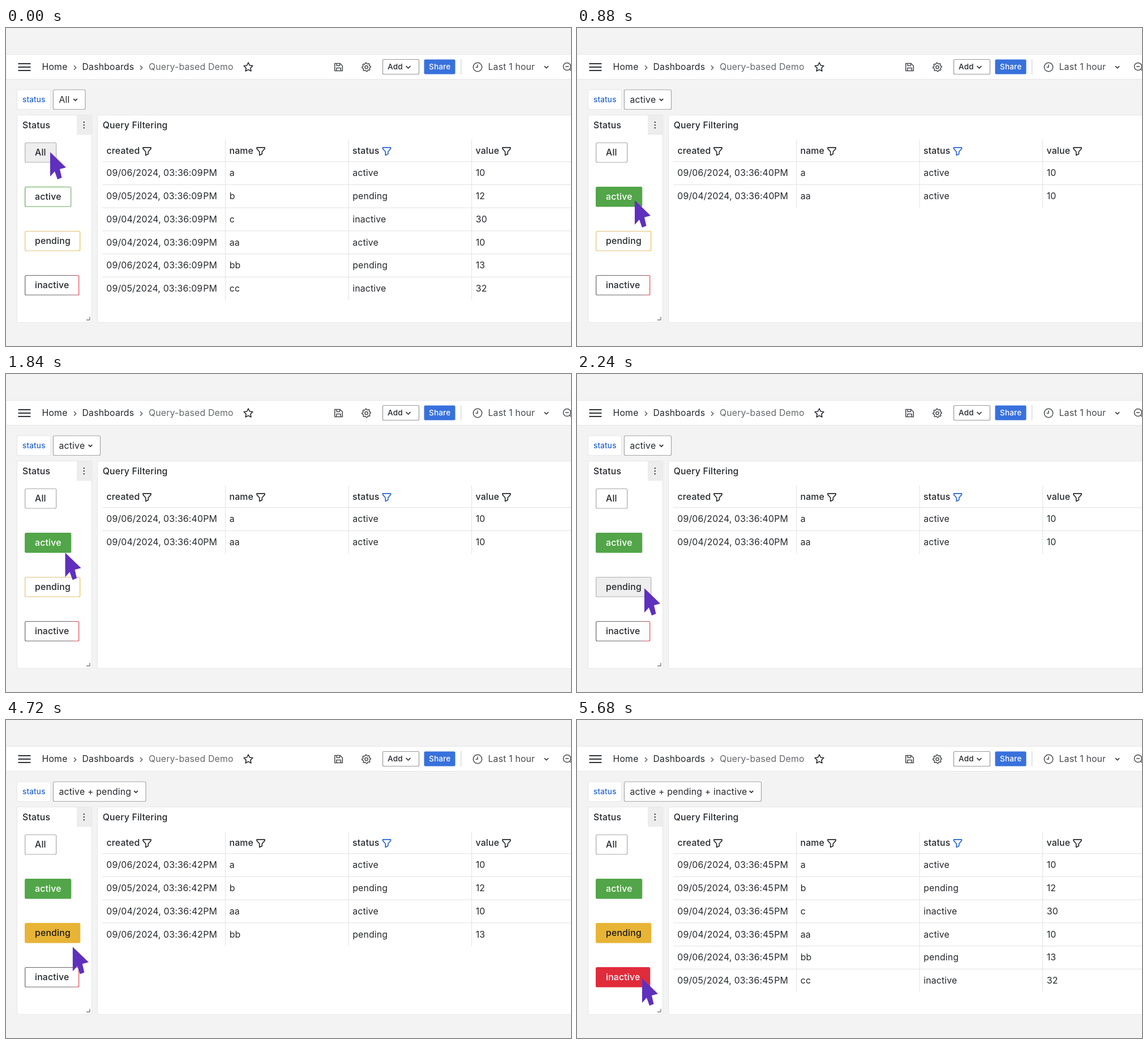
An HTML page with a canvas that plays this animation: 998x561 px, repeating every 6 s.

```html
<!DOCTYPE html>
<html lang="en">
<head>
<meta charset="utf-8">
<title>Query filtering dashboard</title>
<style>
  html, body { margin: 0; width: 100%; height: 100%; overflow: hidden; background: #f3f3f3; }
  canvas { display: block; width: 998px; height: 561px; }
</style>
</head>
<body>
<canvas id="stage"></canvas>
<script>
const W = 998, H = 561, LOOP = 6000;
const canvas = document.getElementById('stage');
const ctx = canvas.getContext('2d');
const dpr = window.devicePixelRatio || 1;
canvas.width = W * dpr;
canvas.height = H * dpr;

const INK = '#25282d', LINE = '#e3e4e6', BLUE = '#2463d6';
const BODY = 15.83, SMALL = 13.56;
const ROW_TOP = 235.6, ROW_H = 40.75;

const records = [
  ['09/06/2024', 'a', 'active', '10'],
  ['09/05/2024', 'b', 'pending', '12'],
  ['09/04/2024', 'c', 'inactive', '30'],
  ['09/04/2024', 'aa', 'active', '10'],
  ['09/06/2024', 'bb', 'pending', '13'],
  ['09/05/2024', 'cc', 'inactive', '32']
];
const columns = [['created', 178, 249], ['name', 395, 450], ['status', 612.5, 672.5], ['value', 830, 884]];

// pick: when the choice is made, load: when the table follows
const steps = [
  { pick: 0, load: 0, chosen: [], clock: '03:36:09', right: 140 },
  { pick: 800, load: 880, chosen: ['active'], clock: '03:36:40', right: 166.5 },
  { pick: 2400, load: 2480, chosen: ['active', 'pending'], clock: '03:36:42', right: 247 },
  { pick: 5280, load: 5360, chosen: ['active', 'pending', 'inactive'], clock: '03:36:45', right: 325.5 }
];

const buttons = [
  { name: 'All', y: 202.5, w: 55, edge: ['#a6a8aa', '#a6a8aa'] },
  { name: 'active', y: 280.5, w: 81, edge: ['#58a94f', '#7fa67b'], fill: '#52a548', ink: '#fff' },
  { name: 'pending', y: 358.5, w: 97, edge: ['#dfc27a', '#ecbf4b'], fill: '#e8b436', ink: '#1c1a16' },
  { name: 'inactive', y: 436.5, w: 95, edge: ['#69646a', '#ef4250'], fill: '#e02b3b', ink: '#fff' }
];

const moves = [
  { start: 215, show: 0, from: [78, 219], to: [102, 304] },
  { start: 1680, show: 1680, from: [102, 304], to: [119, 378] },
  { start: 4522, show: 4720, from: [119, 378], to: [115, 456] }
];

const ease = p => p < 0.5 ? 4 * p ** 3 : 1 - 4 * (1 - p) ** 3;
const latest = (list, key, t) => list.filter(s => t >= s[key]).pop();

function cursorAt(t) {
  const m = latest(moves, 'show', t);
  const k = ease(Math.min(1, Math.max(0, (t - m.start) / 480)));
  return m.from.map((v, i) => v + (m.to[i] - v) * k);
}

function text(str, x, y, color = INK, weight = 400, size = BODY) {
  ctx.font = `${weight} ${size}px Inter, sans-serif`;
  ctx.letterSpacing = size * 0.0107 + 'px';
  ctx.fillStyle = color;
  ctx.fillText(str, x, y);
}

function box(x, y, w, h, fill, edge, r = 2) {
  ctx.beginPath();
  ctx.roundRect(x, y, w, h, r);
  if (fill) { ctx.fillStyle = fill; ctx.fill(); }
  if (edge) { ctx.strokeStyle = edge; ctx.lineWidth = 1.2; ctx.stroke(); }
}

function rect(x, y, w, h, color) {
  ctx.fillStyle = color;
  ctx.fillRect(x, y, w, h);
}

function path(points, color, width = 1.5, close = false) {
  ctx.beginPath();
  points.forEach(([x, y]) => ctx.lineTo(x, y));
  if (close) ctx.closePath();
  ctx.strokeStyle = color;
  ctx.lineWidth = width;
  ctx.stroke();
}

function ring(x, y, r, color, width = 1.5) {
  ctx.beginPath();
  ctx.arc(x, y, r, 0, Math.PI * 2);
  ctx.strokeStyle = color;
  ctx.lineWidth = width;
  ctx.stroke();
}

const shift = (points, x, y) => points.map(p => [p[0] + x, p[1] + y]);
const polar = (n, radius) => Array.from({ length: n }, (_, i) => {
  const a = i / n * Math.PI * 2 - Math.PI / 2, r = radius(i);
  return [Math.cos(a) * r, Math.sin(a) * r];
});
const star = polar(10, i => i % 2 ? 4.1 : 8.3);
const gear = polar(32, i => (i + 1) % 4 < 2 ? 7.7 : 6);
const funnel = [[-7, -6.3], [7, -6.3], [7, -4.3], [2.3, 1], [2.3, 5], [-2.3, 7.3], [-2.3, 1], [-7, -4.3]];
const arrow = [[0, 0], [28, 27], [17, 30], [20.5, 45], [13, 48], [8, 34], [0, 43]];

const down = (x, y, s = 3.5) => path([[x - s, y - s / 2], [x, y + s / 2], [x + s, y - s / 2]], INK, 1.6);
const next = (x, y) => path([[x - 2, y - 3.7], [x + 1.8, y], [x - 2, y + 3.7]], '#55585c', 1.5);

function drawHeader() {
  rect(1, 46, W, 45, '#e5e5e6');
  rect(1, 47, W, 43, '#fff');
  for (const y of [62, 68, 74]) rect(21.5, y, 22, 1.9, INK);
  text('Home', 63.5, 74.3);
  next(122, 70);
  text('Dashboards', 134.5, 74.3);
  next(239, 70);
  text('Query-based Demo', 252, 74.3, '#65686c');
  path(shift(star, 428, 69.3), INK, 1.6, true);

  // save
  path([[580.7, 62.5], [590, 62.5], [594.3, 66.8], [594.3, 75.5], [580.7, 75.5]], '#4b4e52', 1.6, true);
  path([[584, 62.5], [584, 66.5], [589.5, 66.5], [589.5, 63]], '#4b4e52');
  path([[583.8, 75], [583.8, 70.5], [591.2, 70.5], [591.2, 75]], '#4b4e52');

  path(shift(gear, 636.5, 69), '#4b4e52', 1.5, true);
  ring(636.5, 69, 2.6, '#4b4e52');

  box(665.5, 55.5, 64, 26, '#fff', '#98999c');
  text('Add', 674, 73.4, INK, 500, SMALL);
  down(710.5, 69, 4);
  box(738.5, 55.5, 55, 26, '#3871dc');
  text('Share', 747, 73.4, '#fff', 500, SMALL);
  rect(803, 55, 1.2, 27, '#d2d3d5');

  ring(833, 69, 7.7, '#4b4e52');
  path([[833, 64.5], [833, 69.3], [829.5, 69.3]], '#4b4e52');
  text('Last 1 hour', 851.5, 74.3, '#46494e');
  down(954.5, 69);
  ring(991, 68, 6.6, '#4b4e52');
  path([[988, 68], [994, 68]], '#4b4e52');
  path([[995.7, 72.7], [1000, 77]], '#4b4e52');
}

function drawPicker(step) {
  box(19.5, 109, 59, 34.5, '#fff', '#e6e7e8');
  text('status', 29, 131, BLUE, 500, SMALL);
  box(83.5, 109, step.right - 83.5, 34.5, '#fff', '#a3a5a8');
  text(step.chosen.join(' + ') || 'All', 93.5, 131.8);
  down(step.right - 17.5, 126.5, 3.3);
}

function drawButton(b, step, tip) {
  const over = tip[1] >= b.y && tip[1] <= b.y + 34.5;
  const all = b.name === 'All';
  const on = all ? !step.chosen.length : step.chosen.includes(b.name);
  const edge = ctx.createLinearGradient(34, 0, 34 + b.w, 0);
  edge.addColorStop(0, b.edge[0]);
  edge.addColorStop(0.8, b.edge[0]);
  edge.addColorStop(1, b.edge[1]);
  let fill = '#fff', line = edge, ink = INK;
  if (on && !all) {
    fill = line = b.fill;
    ink = b.ink;
  } else if (over) {
    fill = '#eeeeee';
    line = '#b0b1b3';
  } else if (on) {
    fill = '#e3e5e4';
    line = '#9fa3a2';
  }
  box(33.7, b.y, b.w, 34.5, fill, line);
  text(b.name, 51, b.y + 22.8, ink, 500);
}

function drawStatusPanel(step, tip) {
  box(19.5, 153.5, 132, 366, '#fff', '#e6e7e8');
  rect(125, 154, 26, 34.5, '#ededed');
  for (const y of [166.2, 171.2, 176.2]) box(136.6, y - 1.1, 2.3, 2.3, INK, null, 1.1);
  text('Status', 29, 177, INK, 500);
  path([[148, 509.5], [148, 515], [142, 515]], '#999b9e', 1.8);
  buttons.forEach(b => drawButton(b, step, tip));
}

function drawTable(step) {
  box(161.5, 153.5, 850, 366, '#fff', '#e6e7e8');
  text('Query Filtering', 170.7, 177, INK, 500);
  const { chosen } = step;
  const rows = records.filter(r => !chosen.length || chosen.includes(r[2]));
  const end = ROW_TOP + rows.length * ROW_H;
  for (const x of [387, 604.5, 822]) rect(x, 197, 1.1, end - 197, LINE);
  for (const [label, x, icon] of columns) {
    text(label, x - 0.5, 222.2, INK, 500);
    path(shift(funnel, icon, 217.2), label === 'status' ? BLUE : INK, 1.6, true);
  }
  rows.forEach((row, i) => {
    const top = ROW_TOP + i * ROW_H, y = top + 25.8;
    rect(170, top - 0.5, W - 170, 1.1, LINE);
    text(`${row[0]}, ${step.clock}`, 177.3, y);
    text('PM', 348.3, y);
    for (let c = 1; c < 4; c++) text(row[c], columns[c][1] - 0.3, y);
  });
}

function drawCursor([x, y]) {
  ctx.beginPath();
  shift(arrow, x, y).forEach(p => ctx.lineTo(p[0], p[1]));
  ctx.closePath();
  ctx.fillStyle = '#5f2fbe';
  ctx.fill();
}

function draw(t) {
  const tip = cursorAt(t);
  const picked = latest(steps, 'pick', t), loaded = latest(steps, 'load', t);
  ctx.setTransform(dpr, 0, 0, dpr, 0, 0);
  ctx.lineJoin = 'round';
  rect(0, 0, W, H, '#f3f3f3');
  drawHeader();
  drawPicker(picked);
  // the last button changes colour together with its rows
  drawStatusPanel(picked.chosen.length === 3 ? loaded : picked, tip);
  drawTable(loaded);
  drawCursor(tip);
}

const begin = performance.now();
function tick() {
  draw((performance.now() - begin) % LOOP);
  requestAnimationFrame(tick);
}
tick();
</script>
</body>
</html>
```
